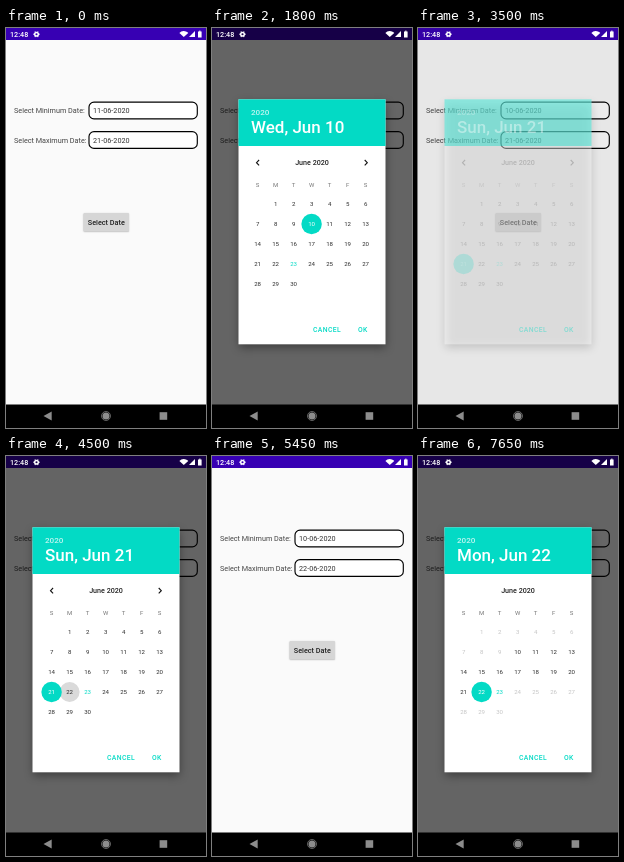
Write an HTML page with a canvas that moves like this. It is 200x400 px and loops after 8 s.

```html
<!DOCTYPE html>
<html lang="en">
<head>
<meta charset="utf-8">
<title>Date range picker</title>
<style>
  html, body { margin: 0; width: 100%; height: 100%; overflow: hidden; background: #fafafa; }
  canvas { display: block; width: 200px; height: 400px; }
</style>
</head>
<body>
<canvas id="stage" width="200" height="400"></canvas>
<script>
const ctx = document.getElementById('stage').getContext('2d');
const LOOP = 8000, STEP = 50;
const TEAL = '#03dac5', INK = '#2b2b2b';
const WEEKDAYS = ['Sun', 'Mon', 'Tue', 'Wed', 'Thu', 'Fri', 'Sat'];

// Each dialog: opening and closing times, fade lengths, and the day picked in it
const dialogs = [
  { open: 350, fadeIn: 400, close: 2300, fadeOut: 250, from: 11, to: 10, press: 1450, pick: 1700 },
  { open: 3450, fadeIn: 400, close: 5050, fadeOut: 400, from: 21, to: 22, press: 4500, pick: 4950 },
  { open: 6350, fadeIn: 225, close: Infinity, fadeOut: 1, from: 22, to: 22, press: LOOP, pick: LOOP, min: 10, max: 23 }
];

const clamp = v => Math.max(0, Math.min(1, v));

function text(str, x, y, size, color, weight = 400, align = 'left', spacing = 0) {
  ctx.font = `${weight} ${size}px Roboto, sans-serif`;
  ctx.textAlign = align;
  ctx.letterSpacing = spacing + 'px';
  ctx.fillStyle = color;
  ctx.fillText(str, x, y);
}

function rect(x, y, w, h, color) {
  ctx.fillStyle = color;
  ctx.fillRect(x, y, w, h);
}

function disc(x, y, r, color) {
  ctx.fillStyle = color;
  ctx.beginPath();
  ctx.arc(x, y, r, 0, 2 * Math.PI);
  ctx.fill();
}

function poly(points, color) {
  ctx.fillStyle = color;
  ctx.beginPath();
  for (const [x, y] of points) ctx.lineTo(x, y);
  ctx.fill();
}

function box(x, y, w, h, r) {
  ctx.beginPath();
  ctx.roundRect(x, y, w, h, r);
}

function field(label, value, y) {
  text(label, 8, y + 11.3, 7.25, '#444');
  box(83, y + .1, 108.3, 16.8, 5);
  ctx.fillStyle = '#fff';
  ctx.fill();
  ctx.strokeStyle = '#000';
  ctx.lineWidth = 1.15;
  ctx.stroke();
  text(value, 87, y + 11.3, 7.25, '#333');
}

function home(t) {
  rect(0, 0, 200, 400, '#fafafa');
  field('Select Minimum Date:', (t < 2350 ? 11 : 10) + '-06-2020', 74);
  field('Select Maximum Date:', (t < 5100 ? 21 : 22) + '-06-2020', 103.5);
  const press = clamp(1 - Math.abs(t - 6170) / 100);
  ctx.save();
  ctx.shadowColor = 'rgba(0,0,0,.25)';
  ctx.shadowBlur = 1.5;
  ctx.shadowOffsetY = .5;
  box(77.5, 185, 45.5, 18.5, 1);
  ctx.fillStyle = `rgb(${Array(3).fill(214 - 28 * press)})`;
  ctx.fill();
  ctx.restore();
  text('Select Date', 100.3, 197, 7.25, '#222', 500, 'center');
}

function statusBar() {
  text('12:48', 4, 8.6, 7.2, '#fff', 500);
  ctx.strokeStyle = '#fff';
  ctx.lineWidth = 1.5;
  ctx.beginPath();
  ctx.arc(30.5, 6.2, 1.8, 0, 7);
  ctx.stroke();
  for (let i = 0; i < 6; i++) {
    const a = i * Math.PI / 3;
    disc(30.5 + 2.7 * Math.cos(a), 6.2 + 2.7 * Math.sin(a), .6, '#fff');
  }
  ctx.fillStyle = '#fff';
  ctx.beginPath();
  ctx.moveTo(177.8, 9);
  ctx.arc(177.8, 9, 6, -2.4, -.74);
  ctx.fill();
  poly([[183, 9], [189, 9], [189, 3]], '#fff');
  rect(192, 3.5, 3.6, 6, '#fff');
  rect(193, 2.7, 1.6, 1, '#fff');
}

function navBar() {
  const grey = '#8c8c8c';
  rect(0, 376.5, 200, 23.5, '#000');
  poly([[37.5, 388], [45.7, 383.6], [45.7, 392.4]], grey);
  disc(100, 388, 3.5, grey);
  ctx.strokeStyle = grey;
  ctx.lineWidth = .7;
  ctx.beginPath();
  ctx.arc(100, 388, 4.5, 0, 7);
  ctx.stroke();
  rect(153.6, 384.2, 7.6, 7.6, grey);
}

function chevron(x, dir) {
  ctx.strokeStyle = '#111';
  ctx.lineWidth = 1.1;
  ctx.beginPath();
  ctx.moveTo(x - dir * 1.3, 132);
  ctx.lineTo(x + dir * 1.3, 134.7);
  ctx.lineTo(x - dir * 1.3, 137.4);
  ctx.stroke();
}

const dayX = day => 45.6 + 18 * (day % 7);
const dayY = day => 176 + 20 * Math.floor(day / 7);

function calendar(d, t, alpha) {
  const day = t < d.pick ? d.from : d.to;
  const soft = alpha * (t - d.open < 200 ? .5 : 1);

  ctx.globalAlpha = alpha;
  ctx.save();
  ctx.shadowColor = 'rgba(0,0,0,.4)';
  ctx.shadowBlur = 9;
  ctx.shadowOffsetY = 4;
  rect(26.5, 71.3, 147, 245, '#fff');
  ctx.restore();
  rect(26.5, 71.3, 147, 46.7, TEAL);
  text('2020', 39, 87, 8.1, 'rgba(255,255,255,.75)', 500);
  text(`${WEEKDAYS[day % 7]}, Jun ${day}`, 39, 105, 17, '#fff', 500);
  text('CANCEL', 101, 303.6, 6.8, TEAL, 500, 'left', .4);
  text('OK', 146, 303.6, 6.8, TEAL, 500, 'left', .4);

  ctx.globalAlpha = soft;
  text('June 2020', 100, 137.2, 7.15, '#222', 500, 'center');
  if (!d.min) {
    chevron(45.8, -1);
    chevron(154, 1);
  }
  [...'SMTWTFS'].forEach((c, i) => text(c, dayX(i), 159.4, 6, '#777', 400, 'center'));
  if (t >= d.press && t < d.pick) disc(dayX(d.to), dayY(d.to), 10, '#dadada');
  disc(dayX(day), dayY(day), 10.2, TEAL);

  for (let n = 1; n <= 30; n++) {
    const inRange = !d.min || (n >= d.min && n <= d.max);
    const color = n === day ? '#fff' : n === 23 ? TEAL : inRange ? INK : '#c4c4c4';
    ctx.globalAlpha = d.min && inRange ? alpha : soft;
    text(n, dayX(n), dayY(n) + 2.2, 6.1, color, 400, 'center');
  }
  ctx.globalAlpha = 1;
}

function draw(t) {
  home(t);
  rect(0, 0, 200, 12, '#3700b3');
  const d = dialogs.find(d => t > d.open && t < d.close + d.fadeOut);
  if (d) {
    const shown = (inTime, outTime) =>
      clamp((t - d.open) / inTime) * (1 - clamp((t - d.close) / outTime));
    rect(0, 0, 200, 377, `rgba(0,0,0,${.6 * shown(d.fadeIn, d.fadeOut)})`);
    calendar(d, t, shown(120, 150));
  }
  statusBar();
  navBar();
}

function frame() {
  const t = performance.now() % LOOP;
  draw(Math.floor(t / STEP) * STEP);
  requestAnimationFrame(frame);
}
frame();
</script>
</body>
</html>
```
